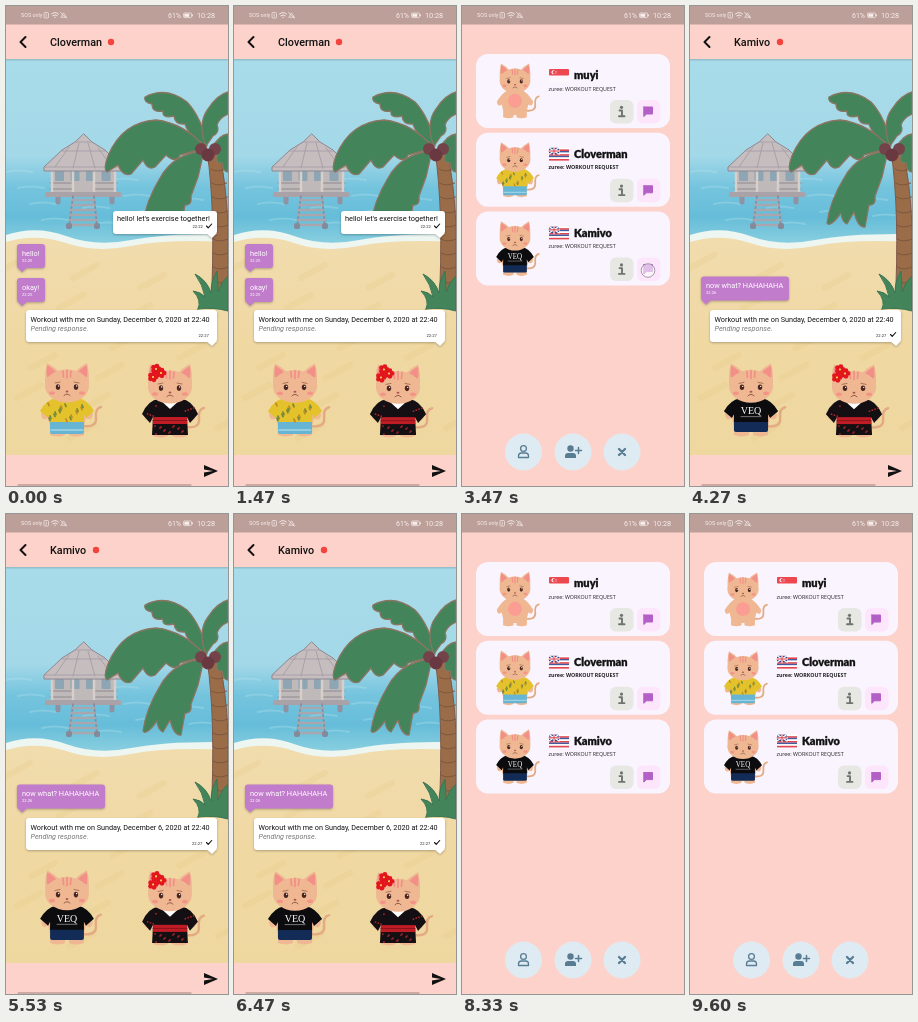
An HTML page that plays this animation: 222 by 480 pixels, repeating every 9.87 s.

```html
<!DOCTYPE html>
<html lang="en">
<head>
<meta charset="utf-8">
<title>Workout chat</title>
<style>
html, body { margin: 0; width: 100%; height: 100%; overflow: hidden; background: #fdd2cb; }
svg { display: block; width: 100vw; height: 100vh; }
text { font-family: Roboto, sans-serif; white-space: pre; }
.name { font: 900 11px Lato, sans-serif; stroke: #111; stroke-width: .3; stroke-linejoin: round; }
.sub { font-family: "Open Sans", sans-serif; font-size: 5.3px; }
.bubble { filter: drop-shadow(0 1px 1px #0004); }
</style>
</head>
<body>
<svg id="stage" viewBox="0 0 222 480"></svg>
<script>
const LOOP = 9870, FADE = 320;
const BACK_1 = 1600, TAP = [3400, 3570], OPEN = 3570, BACK_2 = 6980;
const PINK = '#fdd2cb', FUR = '#efb893', ROSE = '#f28f87', LEAF = '#43845b';

const rect = (x, y, w, h, fill, r = 0) =>
  `<rect x="${x}" y="${y}" width="${w}" height="${h}" rx="${r}" fill="${fill}"/>`;
const oval = (x, y, rx, ry, fill) =>
  `<ellipse cx="${x}" cy="${y}" rx="${rx}" ry="${ry}" fill="${fill}"/>`;
const disc = (x, y, r, fill) => oval(x, y, r, r, fill);
const path = (d, fill, stroke = 'none', w = 1) =>
  `<path d="${d}" fill="${fill}" stroke="${stroke}" stroke-width="${w}" stroke-linecap="round" stroke-linejoin="round"/>`;
const text = (x, y, size, s, fill = '#111', extra = '') =>
  `<text x="${x}" y="${y}" font-size="${size}" fill="${fill}" ${extra}>${s}</text>`;
const group = (transform, body) => `<g transform="${transform}">${body}</g>`;
const repeat = (n, f) => Array.from({ length: n }, (_, i) => f(i)).join('');

// Cats stand on y = 0, centred on x = 0.
const SHIRT = 'M-11-38Q-21-36-27-25L-19-18L-17-22V-14H17V-22L19-18L27-25Q21-36 11-38Z';
const outfits = {
  bare: () => oval(0, -23, 10, 9.5, '#fb9d92'),
  tropical: () => rect(-17, -15, 34, 13, '#67b5d4', 2) + path('M-16-6H16', 'none', '#c3e3ee', 1) +
    path(SHIRT, '#e4c22c') +
    repeat(16, i => path(`M${-19 + i * 11 % 38} ${-33 + i * 7 % 17}l1 2.500`, 'none', i % 3 ? '#75893a' : '#c08a28', 1.8)),
  tee: () => rect(-17, -18, 34, 14, '#122c57', 2) + path(SHIRT, '#0c0c0f') +
    text(0, -22, 10, 'VEQ', '#fff', 'text-anchor="middle" style="font-family:Liberation Serif,serif"') +
    path('M-10-19.500H10', 'none', '#bbb', .6),
  kimono: () => path('M-11-38Q-22-37-28-23L-20-14L-17-20L-18-2H18L17-20L20-14L28-23Q22-37 11-38Z', '#140f12') +
    path('M-11-38L0-28L11-38L7-39H-7Z', '#fff') + rect(-17, -20, 34, 7, '#c01c25') +
    path('M-17-16.500H17', 'none', '#7c1219', .8) +
    repeat(14, i => disc(-15 + i * 9 % 31, -11 + i * 5 % 9, .9, '#a5262c')) +
    repeat(8, i => disc((i % 2 ? 1 : -1) * (14 + i * 1.4), -31 + i * 5 % 11, .9, '#a5262c'))
};
const flower = (x, y) =>
  repeat(5, i => disc(x + 3 * Math.cos(i * 1.257), y + 3 * Math.sin(i * 1.257), 2.4, '#e3151f')) + disc(x, y, 1, '#f8d84a');
const ear = s => group(`scale(${s} 1)`,
  path('M-21.500-48Q-23-63-20-73Q-12-69-6-62Z', FUR) + path('M-20-59Q-21-67-19.500-71Q-13-67-9-62Z', ROSE));
const cat = (x, y, sx, sy, outfit) => group(`translate(${x} ${y}) scale(${sx} ${sy})`, `<g class="cat">` +
  path('M15-10Q30-8 29-18T34-29', 'none', '#e3ab84', 2.5) +
  path('M-11-37Q-19-33-26-22Q-25-14-19-18L-17-10V-1Q-9 2-2-1V-4H2V-1Q9 2 17-1V-10L19-18Q25-14 26-22Q19-33 11-37Z', FUR) +
  outfits[outfit]() + ear(1) + ear(-1) + oval(0, -50, 22, 16.5, FUR) +
  path('M-4-65L-3.500-59M0-66V-58M4-65L3.500-59', 'none', ROSE, 1.7) +
  repeat(2, i => {
    const s = i ? 1 : -1;
    return oval(s * 9, -49, 2.2, 2.8, '#4a2620') + disc(s * 9 + .7, -50, .7, '#fff') +
      oval(s * 15, -43, 3, 1.8, '#f39486') + path(`M${s * 7}-54L${s * 12}-53`, 'none', '#9b6045', .8);
  }) +
  path('M-3-40.500Q0-43.500 3-40.500', 'none', '#7b4438', .8) + oval(0, -44.5, 1.4, 1, '#a9564c') +
  (outfit === 'kimono' ? flower(-9, -64) + flower(-17, -60) + flower(-14, -68) : '') + '</g>');

const hut = () =>
  path('M52 188V196M106 188V196', 'none', '#8e92a3', 5) +
  rect(45, 160, 64, 27, '#bfb9b9') + repeat(4, i => rect(49 + i * 15.5, 165, 9, 10, '#8ea6b3', 1)) +
  path('M44 177H67M88 177H111M44 183H67M88 183H111', 'none', '#8f8a92', 1) +
  path('M46 160V187M67 160V187M88 160V187M109 160V187', 'none', '#d8cfcb', 2.5) +
  path('M78 128L86 136L99 144L116 161V165H38V161L56 144L69 136Z', '#c6bdbf', '#8d8792', 1) +
  path('M69 136H86M56 145H99M63 141L49 161M73 137L67 162M82 137L89 162M92 142L106 161M39 161H115', 'none', '#a19aa2', .8) +
  rect(39, 186, 76, 5, '#a9a3a9', 1) +
  path('M67 190L63 221M88 190L91 221', 'none', '#858a9b', 1.6) +
  repeat(6, i => path(`M${66 - i * .6} ${194 + i * 5}H${88 + i * .6}`, 'none', '#a9a6ad', 2.4)) +
  rect(60, 217, 6, 6, '#858a9b', 2) + rect(88, 217, 6, 6, '#858a9b', 2);

const FRONDS = [
  'M201 140Q196 112 181 96Q160 80 139 91Q137 96 146 98Q146 107 157 105Q156 113 168 110Q169 119 179 118Q183 131 201 140Z',
  'M200 142Q178 117 150 114Q116 116 102 150Q97 163 101 166L112 159Q117 171 125 168L137 154Q142 165 149 161L160 149Q170 158 174 149Z',
  'M198 145Q168 147 154 172Q140 195 137 217Q140 222 151 207Q152 216 157 218L164 206Q168 222 175 221L179 199Q186 200 185 190L192 171Z',
  'M200 140Q191 118 202 103Q211 89 222 86V108Q213 112 211 119Q214 126 207 130Z',
  'M206 142Q213 129 222 128V166Q217 166 216 157Q209 158 211 149Z'
];
const beach = () =>
  rect(0, 53, 222, 105, 'url(#sky)') + rect(0, 150, 222, 92, 'url(#sea)') +
  repeat(14, i => path(`M${i * 53 % 200} ${166 + i * 4}q12-3 26 0`, 'none', '#b7e5ee55', 2)) +
  path('M0 229Q30 219 60 230T125 234T222 228V449H0Z', '#eef6f2') +
  path('M0 236Q30 227 60 237T125 240T222 236V449H0Z', 'url(#sand)') +
  repeat(18, i => path(`M${i * 67 % 215} ${262 + i * 10}l24-13`, 'none', '#e2c07a33', 6)) +
  hut() +
  path('M201 145Q210 205 205 302H222V220Q220 175 213 145Z', '#9a6d48', '#80584a', 1) +
  repeat(10, i => path(`M${205 + Math.min(i, 3) * .7} ${163 + i * 14}q6 4 15 0`, 'none', '#7d573d', 1)) +
  FRONDS.map(d => path(d, LEAF, '#8a7560', 1.3)).join('') +
  disc(195, 143, 6, '#74434a') + disc(209, 143, 6, '#74434a') + disc(202, 149, 6.5, '#693840') +
  path('M192 303Q196 294 187 285Q195 286 199 291Q197 279 189 268Q201 274 205 287Q205 274 211 265Q212 277 212 286Q215 276 222 270V305Q208 301 192 303Z', LEAF, '#3b7553', 1);

// Tail at the lower corner on the sender's side.
const bubble = (x, y, w, h, fill, own) => `<g class="bubble">` + rect(x, y, w, h, fill, 3) +
  path(own ? `M${x + w - 11} ${y + h - 1}H${x + w}L${x + w - 5} ${y + h + 4}Z` : `M${x} ${y + h - 1}H${x + 11}L${x + 5} ${y + h + 4}Z`, fill) + '</g>';
const tick = y => path(`M200.500 ${y}l1.700 1.800l3.500-3.800`, 'none', '#111', 1.1);
const received = (y, w, s, time) => bubble(11, y, w, 24, '#c27ccc', false) +
  text(16, y + 11.5, 7.35, s, '#fff') + text(16, y + 17.5, 4.2, time, '#fff');
const invite = seen => bubble(20, 304, 191, 32, '#fff', true) +
  text(24.5, 316, 7.25, 'Workout with me on Sunday, December 6, 2020 at 22:40') +
  text(24.5, 325, 7.25, 'Pending response.', '#777', 'font-style="italic"') +
  text(seen ? 186 : 192.5, 330.5, 4.2, '22:27', '#333') + (seen ? tick(328.5) : '');

const chat = (id, name, dotX, messages, outfit) => `<g id="${id}">` +
  rect(0, 18, 222, 462, PINK) + '<use href="#beach"/>' + rect(0, 53, 222, 1.5, '#0002') +
  path('M19.500 31L14.500 36L19.500 41', 'none', '#111', 2) +
  text(44, 39.7, 10.8, name, '#111', 'font-weight="500"') + disc(dotX, 36, 3.2, '#f4443e') +
  messages + cat(61, 430, 1, 1, outfit) + cat(164, 431, 1, 1, 'kimono') +
  rect(0, 449, 222, 31, PINK) + path('M12 479H185', 'none', '#9d827e', 1) +
  path('M198 459L212 465L198 471V466.500L207 465L198 463.500Z', '#111') + '</g>';

const flags = {
  lion: () => rect(87, 63, 20, 13, '#fbf7fb', 1) + rect(87, 63, 20, 6.5, '#ed4750', 1) +
    disc(91.5, 66.2, 2, '#fff') + disc(92.5, 66.2, 1.8, '#ed4750') +
    repeat(4, i => disc(93.2 + i % 2 * 1.6, 65.4 + (i >> 1) * 1.6, .4, '#fff')),
  island: () => repeat(8, i => rect(87, 63 + i * 1.6, 20, 1.6, ['#fff', '#e1474f', '#465b9c'][i % 3])) +
    rect(87, 63, 10, 6.5, '#354a8f') + path('M87 63L97 69.500M97 63L87 69.500', 'none', '#fff', 1.2) +
    path('M92 63V69.500M87 66.200H97', 'none', '#fff', 2) + path('M92 63V69.500M87 66.200H97', 'none', '#d93845', 1)
};
const card = (i, name, flag, outfit, weight) => group(`translate(0 ${i * 78.8})`,
  rect(14, 48, 194, 74, '#f9f4fe', 12) + cat(53, 112, .7, .74, outfit) + flags[flag]() +
  text(112, 73, 11, name, '#111', 'class="name"') +
  text(86.5, 84.5, 5.3, 'zuree: WORKOUT REQUEST', '#222', `class="sub" font-weight="${weight}"`) +
  rect(148, 94, 23.5, 23.5, '#e7e8e4', 6) + rect(175, 94, 23.5, 23.5, '#fde5fb', 6) +
  disc(159.5, 101.3, 1.6, '#70746f') + path('M157.500 104.500H160V110M157 110.300H162.500', 'none', '#70746f', 1.9) +
  path('M182 101H190.500V108H184.500L181.800 110.500V101Z', '#b25fc6', '#b25fc6', 1));

const INK = '#587c92';
const list = () => '<g id="list">' + rect(0, 18, 222, 462, PINK) +
  card(0, 'muyi', 'lion', 'bare', 400) + card(1, 'Cloverman', 'island', 'tropical', 700) +
  card(2, 'Kamivo', 'island', 'tee', 400) +
  [61.5, 111, 160].map(x => disc(x, 446, 18.5, '#dfebf2')).join('') +
  `<circle cx="61.500" cy="442.500" r="2.900" fill="none" stroke="${INK}" stroke-width="1.300"/>` +
  path('M56.500 451.500V450Q56.500 447 59.500 447H63.500Q66.500 447 66.500 450V451.500Z', 'none', INK, 1.3) +
  disc(108.5, 442.5, 3.2, INK) + path('M103 452V450Q103 447 106 447H111Q114 447 114 450V452Z', INK) +
  path('M116.500 441.500V447.500M113.500 444.500H119.500', 'none', INK, 1.5) +
  path('M157 443L163 449M163 443L157 449', 'none', INK, 2.3) +
  '<circle id="touch" cx="186" cy="264.500" r="6.800" fill="#ffffff99" stroke="#98909b" stroke-width=".9"/></g>';

const statusBar = () => rect(0, 0, 222, 18.5, '#bd9f99') +
  text(15, 11.3, 5.4, 'SOS only', '#f7eeec') +
  '<rect x="38" y="6.500" width="4.500" height="5.500" rx="1" fill="none" stroke="#f7eeec" stroke-width=".7"/>' +
  path('M40.200 8V10.500', 'none', '#f7eeec', .7) +
  path('M45.500 8Q49 5 52.500 8M46.800 9.700Q49 8 51.200 9.700M48.700 11.300H49.300', 'none', '#f7eeec', .9) +
  path('M55 11Q56.500 10 56.300 8.500Q57.300 5.500 59 8.500Q59 10 60.200 11ZM54.500 6.500L60.500 12', 'none', '#f7eeec', .7) +
  text(162, 12, 7, '61%', '#f7eeec') +
  '<rect x="177.500" y="7" width="8" height="4.600" rx="1" fill="none" stroke="#f7eeec" stroke-width=".7"/>' +
  rect(178.3, 7.8, 5, 3, '#f7eeec') + rect(186, 8.3, .8, 2, '#f7eeec') + text(191, 12, 7.3, '10:28', '#f7eeec');

const gradient = (id, ...colours) => `<linearGradient id="${id}" x2="0" y2="1">` +
  colours.map((c, i) => `<stop offset="${i / (colours.length - 1)}" stop-color="${c}"/>`).join('') + '</linearGradient>';

const $ = id => document.getElementById(id);
$('stage').innerHTML =
  '<defs>' + gradient('sky', '#a9dcea', '#a3d8e8') + gradient('sea', '#a3d8e8', '#75c4de', '#66bdd9', '#8fd2e0') +
  gradient('sand', '#f1dcae', '#f0d8a2', '#efd7a0') + `<g id="beach">${beach()}</g></defs>` +
  chat('first', 'Cloverman', 105,
    bubble(107, 205, 104, 23, '#fff', true) + text(111, 215, 7.4, "hello! let's exercise together!") +
    text(186.5, 222, 4.2, '22:22', '#333') + tick(220) +
    received(238, 28, 'hello!', '22:25') + received(272, 28, 'okay!', '22:25') + invite(false), 'tropical') +
  chat('second', 'Kamivo', 90, received(270.5, 88, 'now what? HAHAHAHA', '22:26') + invite(true), 'tee') +
  list() + statusBar();

const cats = [...document.querySelectorAll('.cat')];
const fade = (t, start) => Math.min(1, Math.max(0, (t - start) / FADE));
const show = (id, on) => $(id).setAttribute('visibility', on ? 'visible' : 'hidden');

function draw(now) {
  const t = now % LOOP;
  const early = t < 3000;
  show('first', early);
  show('second', !early);
  show('touch', t >= TAP[0] && t < TAP[1]);
  $('list').setAttribute('opacity', fade(t, BACK_1) - fade(t, OPEN) + fade(t, BACK_2));
  const breath = .012 * Math.sin(t / LOOP * 2 * Math.PI * 6);
  cats.forEach(c => c.setAttribute('transform', `scale(${1 - breath / 2} ${1 + breath})`));
  requestAnimationFrame(() => draw(performance.now() - start));
}
const start = performance.now();
draw(0);
</script>
</body>
</html>
```
